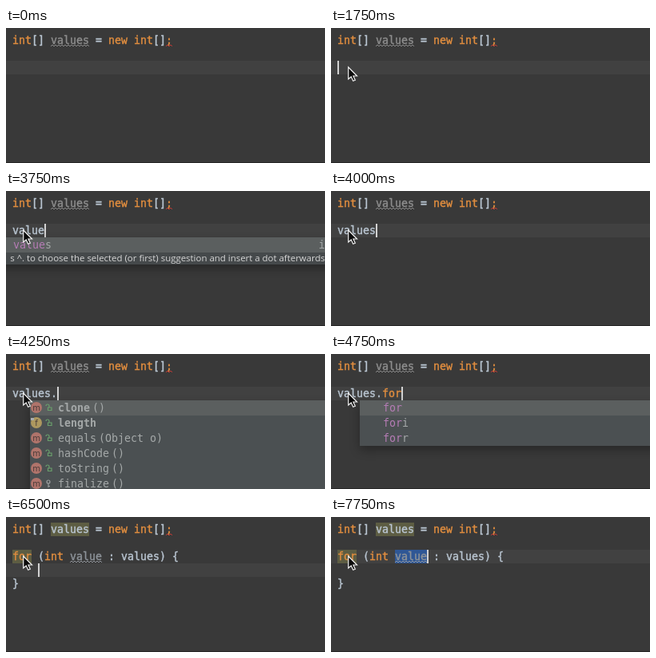
An HTML page with a canvas that plays this animation: 399x169 px, repeating every 8 s.

```html
<!DOCTYPE html>
<html lang="en">
<head>
<meta charset="utf-8">
<title>Postfix completion</title>
<style>
  html, body { margin: 0; width: 100%; height: 100%; overflow: hidden; background: #393939; }
  canvas { display: block; width: 399px; height: 169px; }
</style>
</head>
<body>
<canvas id="stage" width="399" height="169"></canvas>
<script>
const ctx = document.getElementById('stage').getContext('2d');
const LOOP = 8000, W = 399, H = 169;
const CHAR = 8, LEFT = 8, LINE = 17, TOP = 7, ROW = 19, POPUP_TOP = 58;
const MONO = '13.29px "DejaVu Sans Mono", monospace';
const HINT = 's ^. to choose the selected (or first) suggestion and insert a dot afterwards';
const C = {
  bg: '#393939', band: '#414141', text: '#b9c5d1', key: '#e08d3f', dim: '#8d8d8d',
  popup: '#4b5052', chosen: '#5b5f5f', hint: '#45494b', item: '#a4a8a8', match: '#b57cb5',
  olive: '#5d5d43', select: '#2f5795', blue: '#0869b5', red: '#d03b35'
};

// Each step overrides part of the state from its time onwards.
const steps = [
  { at: 0, mouse: null, code: '', caret: null, line: 2, popup: null, loop: false },
  { at: 500, mouse: [65, 47] },
  { at: 750, mouse: [24, 40] },
  { at: 1000, mouse: [21, 48] },
  { at: 1750, caret: 0 },
  { at: 2500, code: 'v', caret: 1, popup: () => wordPopup(1, true) },
  { at: 2750, popup: () => wordPopup(2) },
  { at: 3000, code: 'va', caret: 2 },
  { at: 3250, code: 'val', caret: 3, popup: () => wordPopup(3) },
  { at: 3500, code: 'valu', caret: 4, popup: () => wordPopup(4) },
  { at: 3750, code: 'value', caret: 5, popup: () => wordPopup(5) },
  { at: 4000, code: 'values', caret: 6, popup: null },
  { at: 4250, code: 'values.', caret: 7, popup: memberPopup },
  { at: 4500, caret: null, popup: postfixPopup },
  { at: 4750, code: 'values.for', caret: 10 },
  { at: 5000, popup: null },
  { at: 5250, loop: true, caret: 14, selected: true, boxed: true, popup: namePopup },
  { at: 6250, line: 3, caret: 4, selected: false, boxed: false, popup: null },
  { at: 6500, marked: true, unused: true },
  { at: 7250, line: 2, caret: 14, selected: true, unused: false },
  { at: 7750, unused: true }
];

function rect(x, y, w, h, color) {
  ctx.fillStyle = color;
  ctx.fillRect(x, y, w, h);
}

function text(str, x, y, color, font = MONO) {
  ctx.font = font;
  ctx.fillStyle = color;
  ctx.fillText(str, x, y);
}

// Editor text is rendered slightly heavier than popup text.
function heavyText(str, x, y, color) {
  text(str, x, y, color);
  ctx.strokeStyle = color;
  ctx.lineWidth = 0.4;
  ctx.strokeText(str, x, y);
}

const column = n => LEFT + n * CHAR;
const lineTop = n => TOP + n * LINE;
const rowTop = n => POPUP_TOP + n * ROW;
const rowBase = n => rowTop(n) + 14;

// Draws [string, color] parts one after another on the character grid.
function codeLine(line, parts) {
  let col = 0;
  for (const [str, color] of parts) {
    heavyText(str, column(col), lineTop(line) + 13, color);
    col += str.length;
  }
}

function squiggle(line, from, count, color) {
  const y = lineTop(line) + 16;
  ctx.beginPath();
  for (let x = 0; x <= count * CHAR; x += 2) {
    ctx.lineTo(column(from) + x, y - (x % 4 ? 2 : 0));
  }
  ctx.strokeStyle = color;
  ctx.lineWidth = 0.9;
  ctx.stroke();
}

function panel(x, w, h) {
  ctx.save();
  ctx.shadowColor = 'rgba(0,0,0,.32)';
  ctx.shadowBlur = 12;
  ctx.shadowOffsetY = 5;
  rect(x, POPUP_TOP, w, h, C.popup);
  ctx.restore();
}

function matched(str, count, x, y) {
  text(str.slice(0, count), x, y, C.match);
  text(str.slice(count), x + count * CHAR, y, C.item);
}

function wordPopup(count, both = false) {
  const hintTop = rowTop(both ? 2 : 1);
  panel(-30, 600, hintTop + 15 - POPUP_TOP);
  rect(0, POPUP_TOP, W, ROW, C.chosen);
  matched('values', count, 9, rowBase(0));
  text('int[]', 391, rowBase(0), C.item);
  if (both) {
    matched('visible', count, 9, rowBase(1));
    text('Set view visibility to VISIBLE', 191, rowBase(1), C.item);
  }
  rect(0, hintTop, W, 15, C.hint);
  ctx.textAlign = 'right';
  text(HINT, W, hintTop + 11, '#d6d6d6', '500 11.45px "Open Sans", sans-serif');
  ctx.textAlign = 'left';
}

function memberIcon(kind, y) {
  ctx.beginPath();
  ctx.arc(38, y, 7, 0, 7);
  ctx.fillStyle = kind === 'm' ? '#b0746b' : '#ad985f';
  ctx.fill();
  ctx.textAlign = 'center';
  text(kind, 38, y + 3.5, '#4a3c39', '10px "DejaVu Sans", sans-serif');
  ctx.textAlign = 'left';
  if (kind === 'f') rect(31, y - 6, 4, 3, '#a9adad');
}

function accessIcon(open, y) {
  const color = open ? '#6a9f6c' : '#9a9e9e';
  ctx.strokeStyle = color;
  ctx.lineWidth = 1.2;
  ctx.beginPath();
  if (open) {
    ctx.arc(52, y - 2, 2, Math.PI, 0);
    ctx.lineTo(54, y);
    ctx.rect(52.5, y, 4.5, 3.5);
  } else {
    ctx.arc(53, y - 2, 2, 0, 7);
    ctx.moveTo(53, y);
    ctx.lineTo(53, y + 5);
    ctx.moveTo(53, y + 3.5);
    ctx.lineTo(55, y + 3.5);
  }
  ctx.stroke();
}

function memberPopup() {
  const tailGap = 3;
  panel(30, 500, 200);
  rect(30, POPUP_TOP, W, ROW, C.chosen);
  ['clone()', 'length', 'equals(Object o)', 'hashCode()', 'toString()', 'finalize()']
    .forEach((member, i) => {
      const y = rowTop(i) + 9;
      const [name, tail] = member.split(/(?=\()/);
      memberIcon(tail ? 'm' : 'f', y);
      accessIcon(i < 5, y);
      text(name, 65, rowBase(i), C.item, (i < 2 ? 'bold ' : '') + MONO);
      if (tail) text(tail, 65 + name.length * CHAR + tailGap, rowBase(i), C.item);
    });
}

function postfixPopup() {
  panel(36, 500, 3 * ROW);
  rect(36, POPUP_TOP, W, ROW, C.chosen);
  ['for', 'fori', 'forr'].forEach((name, i) => matched(name, 3, 65, rowBase(i)));
}

function namePopup() {
  panel(73, 143, 2 * ROW);
  rect(73, POPUP_TOP, 143, ROW, C.blue);
  text('value', 81, rowBase(0), '#d3dde5');
  text('i', 81, rowBase(1), '#bcbcbc');
  ctx.strokeStyle = '#5e6163';
  ctx.lineWidth = 1;
  ctx.strokeRect(73.5, 57.5, 142, 39);
}

function drawDeclaration(s) {
  if (s.marked) rect(56, TOP, 48, LINE, C.olive);
  codeLine(0, [
    ['int', C.key], ['[] ', C.text], ['values', s.marked ? C.text : C.dim],
    [' = ', C.text], ['new int', C.key], ['[]', C.text], [';', C.key]
  ]);
  if (!s.marked) squiggle(0, 6, 6, '#939393');
  squiggle(0, 24, 1, C.red);
}

function drawLoop(s) {
  const y = lineTop(2);
  if (s.marked) rect(LEFT, y, 24, LINE, C.olive);
  if (s.selected) rect(80, y, 40, LINE, C.select);
  codeLine(2, [
    ['for', C.key], [' (', C.text], ['int', C.key], [' ', C.text],
    ['value', s.unused ? '#8d9399' : C.text], [' : values) {', C.text]
  ]);
  if (s.unused) squiggle(2, 9, 5, '#9a9fa5');
  if (s.boxed) {
    ctx.strokeStyle = C.red;
    ctx.lineWidth = 1;
    ctx.strokeRect(80.5, y + 0.5, 40, LINE - 1);
  }
  codeLine(4, [['}', C.text]]);
}

function drawMouse([x, y]) {
  ctx.save();
  ctx.translate(x + 0.7, y + 1);
  ctx.beginPath();
  for (const [px, py] of [[0, 0], [0, 15], [3.5, 12], [6, 17.3], [8.6, 16.2], [6.2, 11], [10.8, 11]]) {
    ctx.lineTo(px, py);
  }
  ctx.closePath();
  ctx.fillStyle = '#0b0b0b';
  ctx.fill();
  ctx.strokeStyle = '#f0f0f0';
  ctx.lineWidth = 1.2;
  ctx.stroke();
  ctx.restore();
}

function draw(time) {
  const s = Object.assign({}, ...steps.filter(step => step.at <= time));
  rect(0, 0, W, H, C.bg);
  rect(0, lineTop(s.line), W, LINE, C.band);
  rect(0, H - 1, W, 1, '#272727');
  drawDeclaration(s);
  if (s.loop) {
    drawLoop(s);
  } else {
    codeLine(2, [[s.code.slice(0, 7), C.text], [s.code.slice(7), C.key]]);
  }
  if (s.caret !== null) rect(column(s.caret), lineTop(s.line), 2, LINE, '#d2d2d2');
  if (s.popup) s.popup();
  if (s.mouse) drawMouse(s.mouse);
}

function tick() {
  draw(performance.now() % LOOP);
  requestAnimationFrame(tick);
}
tick();
</script>
</body>
</html>
```
